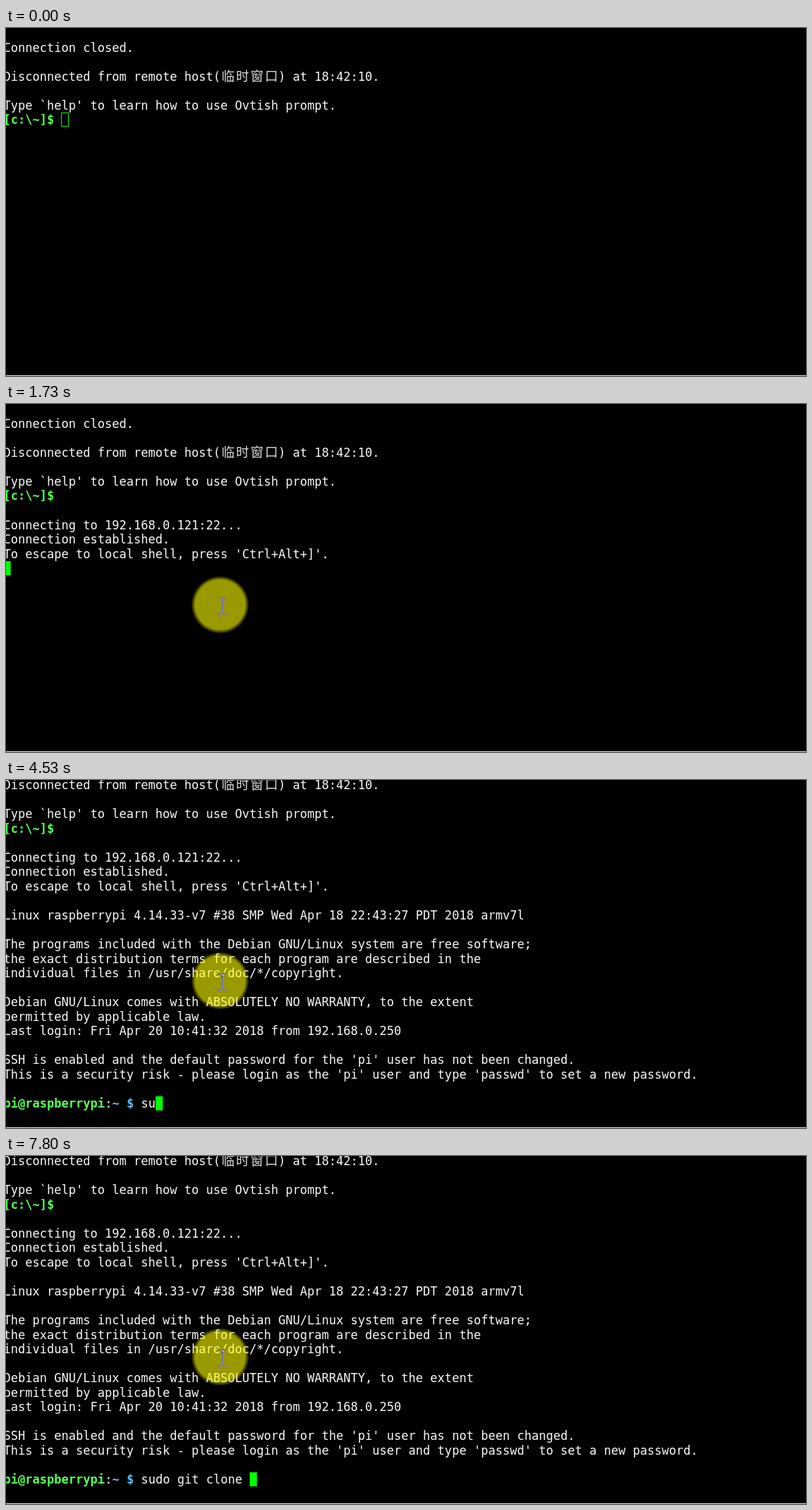
Recreate the animation shown at these times as an HTML page with a canvas. Size 1134 by 494 pixels, loop 8 s.

```html
<!DOCTYPE html>
<html lang="en">
<head>
<meta charset="utf-8">
<title>Terminal session</title>
<style>
  html, body { margin: 0; width: 100%; height: 100%; overflow: hidden; background: #000; }
  canvas { display: block; }
</style>
</head>
<body>
<canvas id="screen" width="1134" height="494"></canvas>
<script>
const ctx = document.getElementById('screen').getContext('2d');
const LOOP = 8000;
const CELL_W = 10.267, CELL_H = 20.533, LEFT = -3.6, TOP = 17.8;
const WHITE = '#f8f8f8', LIME = '#55ff55', BLUE = '#5cbfee', CURSOR = '#00ff00';
const MONO = '17.05px "DejaVu Sans Mono", monospace';
const CJK = '300 18.5px "Noto Sans CJK SC", "Noto Sans CJK", sans-serif';

// Plain output by row, grouped by the time it is printed.
const output = [
  { at: 0, row: 0, lines: [
    'Connection closed.',
    '',
    'Disconnected from remote host(        ) at 18:42:10.',
    '',
    "Type `help' to learn how to use Ovtish prompt."] },
  { at: 1470, row: 7, lines: [
    'Connecting to 192.168.0.121:22...',
    'Connection established.',
    "To escape to local shell, press 'Ctrl+Alt+]'."] },
  { at: 2400, row: 11, lines: [
    'Linux raspberrypi 4.14.33-v7 #38 SMP Wed Apr 18 22:43:27 PDT 2018 armv7l',
    '',
    'The programs included with the Debian GNU/Linux system are free software;',
    'the exact distribution terms for each program are described in the',
    'individual files in /usr/share/doc/*/copyright.',
    '',
    'Debian GNU/Linux comes with ABSOLUTELY NO WARRANTY, to the extent',
    'permitted by applicable law.'] },
  { at: 2470, row: 19, lines: [
    'Last login: Fri Apr 20 10:41:32 2018 from 192.168.0.250'] },
  { at: 2730, row: 21, lines: [
    "SSH is enabled and the default password for the 'pi' user has not been changed.",
    "This is a security risk - please login as the 'pi' user and type 'passwd' to set a new password."] }
];

const command = 'sudo git clone ';
// [time, value] steps; each value holds until the next time.
const typed = [[0, 0], [4530, 2], [4600, 4], [4930, 5], [5530, 6], [5670, 7], [5800, 8],
  [5930, 9], [6270, 10], [6800, 11], [7200, 12], [7400, 13], [7530, 14], [7800, 15]];
const cursorRow = [[0, 5], [1470, 10], [2400, 19], [2470, 20], [2730, 24]];
const pointer = [[0, null], [200, [421, 60]], [265, [20, 56]], [330, null],
  [1670, [283.5, 239.5]], [1730, [303.5, 285]]];

const valueAt = (steps, t) => steps.filter(([at]) => at <= t).pop()[1];
const cellX = col => LEFT + col * CELL_W;

function drawScreen(t) {
  const scroll = t >= 2730 ? 3 : 0;
  const cellY = row => TOP + (row - scroll) * CELL_H;

  function put(row, col, text, color = WHITE, font = MONO) {
    ctx.font = font;
    ctx.fillStyle = color;
    ctx.fillText(text, cellX(col), Math.round(cellY(row) + 16));
  }

  for (const { at, row, lines } of output) {
    if (t >= at) lines.forEach((line, i) => put(row + i, 0, line));
  }
  [...'临时窗口'].forEach((char, i) => put(2, 30.1 + 2 * i, char, '#dddddd', CJK));
  put(5, 0, '[c:\\~]$', LIME, 'bold ' + MONO);

  const row = valueAt(cursorRow, t);
  let col = 0;
  if (row === 24) {
    const count = valueAt(typed, t);
    put(row, 0, 'pi@raspberrypi', LIME, 'bold ' + MONO);
    put(row, 14, ':');
    put(row, 15, '~ $', BLUE, 'bold ' + MONO);
    put(row, 19, command.slice(0, count));
    col = 19 + count;
  }

  if (row === 5) {
    ctx.strokeStyle = CURSOR;
    ctx.lineWidth = 1;
    ctx.strokeRect(78.5, 120.5, 10, 19);
  } else {
    ctx.fillStyle = CURSOR;
    ctx.fillRect(cellX(col), cellY(row), CELL_W, CELL_H - 0.5);
  }
}

function drawPointer([x, y]) {
  const glow = ctx.createRadialGradient(x, y, 0, x, y, 41);
  glow.addColorStop(0, 'rgba(255,255,0,.6)');
  glow.addColorStop(0.86, 'rgba(255,255,0,.6)');
  glow.addColorStop(1, 'rgba(255,255,0,0)');
  ctx.fillStyle = glow;
  ctx.fillRect(x - 41, y - 41, 82, 82);

  // The I-beam inverts whatever lies below it.
  ctx.save();
  ctx.globalCompositeOperation = 'difference';
  ctx.translate(x + 3, y + 1.5);
  ctx.strokeStyle = '#fff';
  ctx.lineWidth = 1.3;
  ctx.stroke(new Path2D('M-6.5-11.5H-1M1-11.5H6.5M0-10.8V10.8M-6.5 11.5H-1M1 11.5H6.5'));
  ctx.restore();
}

function draw(now) {
  const t = now % LOOP;
  ctx.fillStyle = '#000';
  ctx.fillRect(0, 0, 1134, 494);
  drawScreen(t);
  const spot = valueAt(pointer, t);
  if (spot) drawPointer(spot);
  ctx.fillStyle = '#e4e4e4';
  ctx.fillRect(0, 493, 1134, 1);
}

function tick() {
  draw(performance.now());
  requestAnimationFrame(tick);
}
tick();
</script>
</body>
</html>
```
